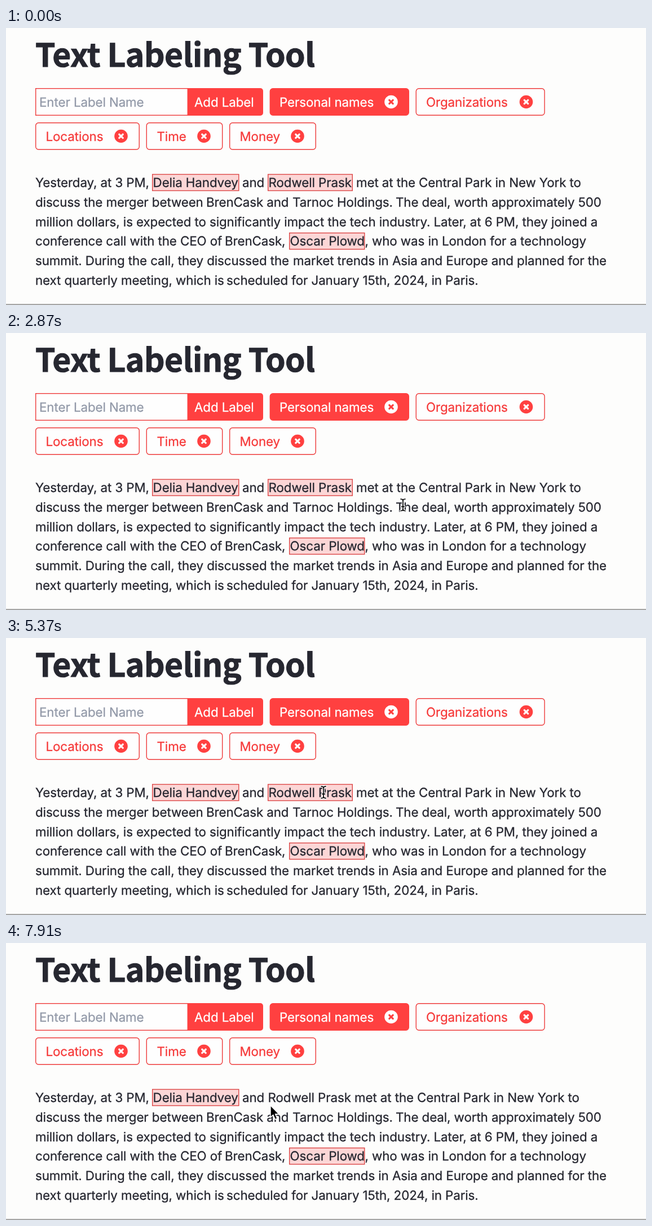
An HTML page for the animation above (8000 ms loop, 1135 by 493 pixels).

```html
<!DOCTYPE html>
<html lang="en">
<head>
<meta charset="utf-8">
<title>Text Labeling Tool</title>
<style>
html, body { margin: 0; width: 100%; height: 100%; overflow: hidden; background: #fdfdfc; }
svg { display: block; width: 1135px; height: 493px; }
text {
  font: 22.4px Inter, "Liberation Sans", sans-serif;
  font-optical-sizing: none;
  letter-spacing: -.0052em;
  text-rendering: geometricPrecision;
  color: #262730;
  fill: currentColor;
  stroke: currentColor;
  stroke-width: .3;
}
.title {
  font: 700 56.9px "Noto Sans CJK JP", "Noto Sans CJK SC", "Open Sans", sans-serif;
  letter-spacing: -.009em;
  stroke-width: 1;
}
.hint { color: #939aa9; }
.red { color: #f63a3a; }
.white { color: #fff; }
.solid { fill: #ff4040; stroke: #ff4040; }
.outline { fill: #fefefe; stroke: #ee3b3b; }
.mark { fill: #fcd6d6; stroke: #dc4545; }
.box { stroke-width: 1.4; }
</style>
</head>
<body>
<svg viewBox="0 0 1135 493" id="stage"></svg>
<script>
const stage = document.getElementById('stage');

const label = (x, y, str, cls = '') => `<text x="${x}" y="${y}" class="${cls}">${str}</text>`;

const box = (x, y, w, h, cls, r = 0) =>
  `<rect x="${x + .7}" y="${y + .7}" width="${w - 1.4}" height="${h - 1.4}" rx="${r}" class="box ${cls}"/>`;

const closeIcon = (x, y, disc, cross) =>
  `<circle cx="${x}" cy="${y}" r="11.8" fill="${disc}"/>
   <path d="M${x - 3.2} ${y - 3.2}l6.4 6.4m0 -6.4l-6.4 6.4" stroke="${cross}" stroke-width="3.3" stroke-linecap="round"/>`;

const tag = (x, y, w, textX, iconX, str, active) =>
  box(x, y, w, 49, active ? 'solid' : 'outline', 5) +
  label(textX, y + 33, str, active ? 'white' : 'red') +
  closeIcon(iconX, y + 24.5, ...(active ? ['#fff', '#ff4040'] : ['#ff4040', '#fff']));

const LINE = 34.75;
const lineY = n => 283.2 + n * LINE;

// Each line is a list of [x, text] runs
const lines = [
  [[52, 'Yesterday, at 3 PM,'], [419, 'and']],
  [[52, 'discuss the merger between'], [355, 'BrenCask and'], [508, 'Tarnoc Holdings.'], [691, 'The deal, worth approximately 500']],
  [[52, 'million dollars, is expected to'], [361, 'significantly impact the tech industry.'], [758.5, 'Later, at 6 PM, they joined a']],
  [[52, 'conference call with the CEO of'], [388, 'BrenCask,'], [636.5, ', who was in London for a technology']],
  [[52, 'summit. During the call, they discussed the'], [509, 'market trends in Asia'], [735, 'and Europe and planned for the']],
  [[52, 'next quarterly meeting, which is'], [391, 'scheduled for January 15th, 2024, in Paris.']]
];

const mark = (x, n, w, str) =>
  box(x, 259.8 + n * LINE, w, 30.4, 'mark') + label(x + 1.6, lineY(n), str);

const secondName = 'Rodwell Prask', tail = 'met at the Central Park in New York to';

const beamShape = (color, width) =>
  `<path d="M-4 -10.5Q0 -10.5 0 -7.5Q0 -10.5 4 -10.5M-4 10.5Q0 10.5 0 7.5Q0 10.5 4 10.5M0 -7.5V7.5M-2.5 3H2.5"
    fill="none" stroke="${color}" stroke-width="${width}" stroke-linecap="round"/>`;

stage.innerHTML =
  label(52, 69, 'Text Labeling Tool', 'title') +
  box(52, 107, 271, 49, 'outline') +
  '<path d="M322 107H451a5 5 0 0 1 5 5V151a5 5 0 0 1 -5 5H322Z" fill="#ff4040"/>' +
  label(59, 140, 'Enter Label Name', 'hint') +
  label(334, 140, 'Add Label', 'white') +
  tag(467.6, 107, 247.4, 485, 683, 'Personal names', true) +
  tag(726.6, 107, 229.2, 745, 922.5, 'Organizations') +
  tag(52, 168, 185, 70.5, 204, 'Locations') +
  tag(248.6, 168, 135.8, 267.5, 351, 'Time') +
  tag(396, 168, 154, 414.5, 517, 'Money') +
  lines.map((runs, n) => runs.map(([x, str]) => label(x, lineY(n), str)).join('')).join('') +
  mark(259, 0, 154.5, 'Delia Handvey') +
  mark(502, 3, 134.5, 'Oscar Plowd') +
  `<g id="marked">${mark(464, 0, 151, secondName)}${label(621, lineY(0), tail)}</g>
   <g id="plain">${label(464.6, lineY(0), secondName)}${label(618, lineY(0), tail)}</g>
   <rect y="491.4" width="1135" height="1.2" fill="#6c6c6c"/>
   <path id="arrow" d="M0 0V21.3L4.8 16.9L8.3 25L12 23.4L8.6 15.5H15Z" fill="#000" stroke="#fff" stroke-width="1.4"/>
   <g id="beam">${beamShape('#fff', 4)}${beamShape('#000', 1.7)}</g>`;

const [marked, plain, arrow, beam] = ['marked', 'plain', 'arrow', 'beam'].map(id => document.getElementById(id));

// Pointer path: [ms, x, y]
const path = [
  [300, 735, 500], [850, 701, 322], [2550, 701, 322], [2800, 704, 306], [3500, 704, 306],
  [4400, 543, 275], [5100, 543, 275], [5700, 590, 274], [6450, 590, 274],
  [6850, 497, 273], [7100, 497, 273], [7600, 469, 289], [8000, 469, 289]
];
const REMOVE_AT = 6400;

function pointer(t) {
  const i = path.findIndex(p => p[0] > t);
  if (i < 1) return null;
  const [t0, x0, y0] = path[i - 1], [t1, x1, y1] = path[i];
  const u = (t - t0) / (t1 - t0), e = u * u * (3 - 2 * u);
  return [x0 + (x1 - x0) * e, y0 + (y1 - y0) * e];
}

const show = (el, on) => { el.style.display = on ? '' : 'none'; };

function draw(t) {
  show(marked, t < REMOVE_AT);
  show(plain, t >= REMOVE_AT);
  const p = pointer(t);
  // The text beam shows only over a line of text
  const row = p && Math.min(5, Math.round((p[1] - 275) / LINE));
  const onText = p && Math.abs(p[1] - 275 - row * LINE) < 11;
  show(arrow, p && !onText);
  show(beam, p && onText);
  if (p) (onText ? beam : arrow).setAttribute('transform', `translate(${p})`);
}

const start = performance.now();
function tick() {
  draw((performance.now() - start) % 8000);
  requestAnimationFrame(tick);
}
tick();
</script>
</body>
</html>
```
